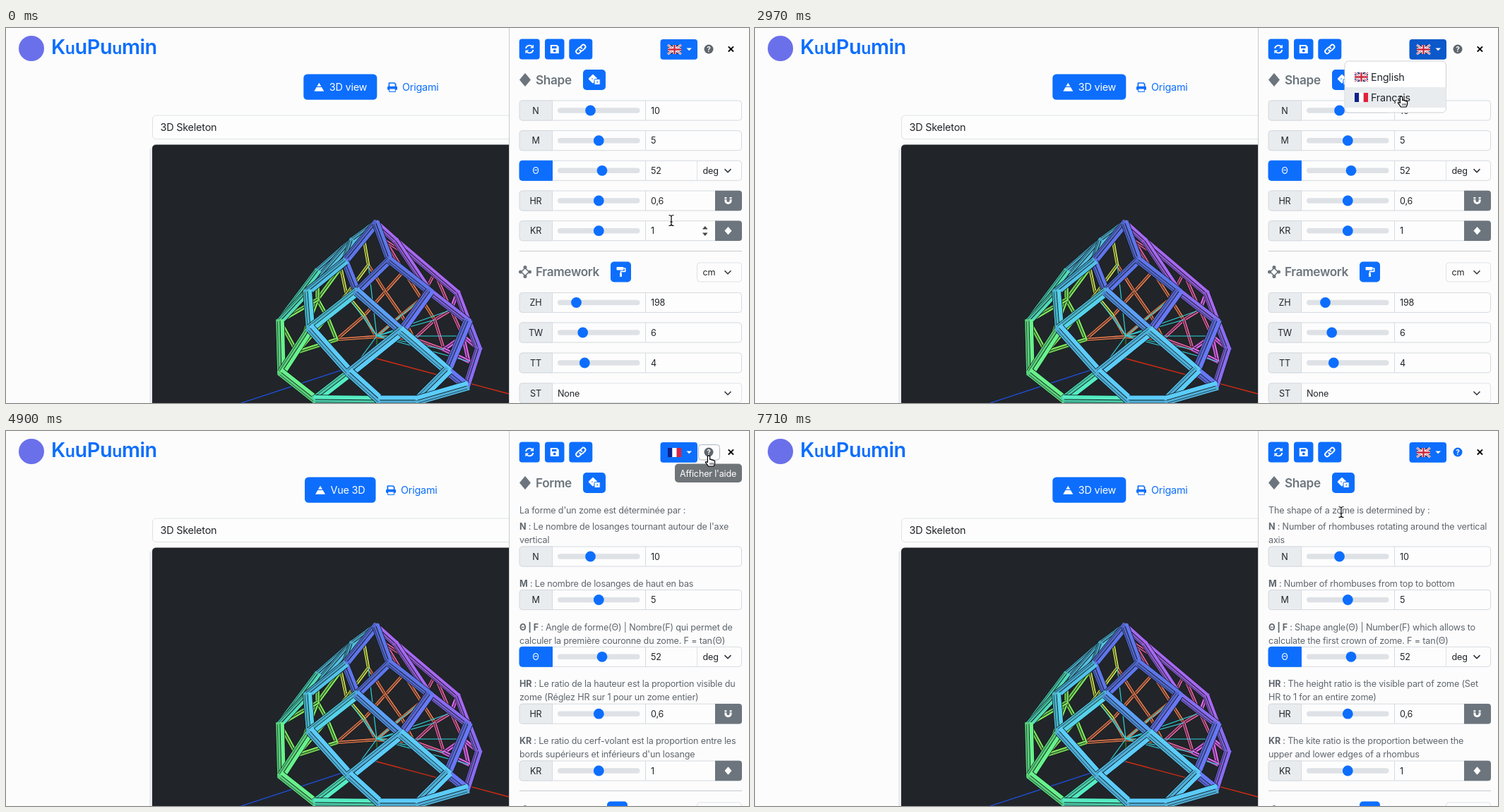
An HTML page for the animation above (8000 ms loop, 1052 px wide and 532 px high).

```html
<!DOCTYPE html>
<html lang="en">
<head>
<meta charset="utf-8">
<title>Zome designer</title>
<style>
  html, body { margin: 0; width: 100%; height: 100%; overflow: hidden; background: #fcfcfc; }
  svg { display: block; width: 1052px; height: 532px; }
  text { font-family: Inter, "Liberation Sans", sans-serif; letter-spacing: -.014em; white-space: pre; }
</style>
</head>
<body>
<svg id="stage" viewBox="0 0 1052 532">
  <g id="page"></g>
  <g id="tabs"></g>
  <g id="panel"></g>
  <g id="cursor"></g>
</svg>
<script>
const BLUE = '#0d6efd', GREY = '#6c757d', INK = '#212529', LINE = '#dee2e6', SOFT = '#e9ecef';
const LOOP = 8000;
const $ = id => document.getElementById(id);

// ---------- drawing helpers ----------
const rect = (x, y, w, h, fill, r = 0, stroke = 'none') =>
  `<rect x="${x}" y="${y}" width="${w}" height="${h}" rx="${r}" fill="${fill}" stroke="${stroke}"/>`;
const path = (d, fill, stroke = 'none', w = 1) =>
  `<path d="${d}" fill="${fill}" stroke="${stroke}" stroke-width="${w}" stroke-linejoin="round"/>`;
const circle = (x, y, r, fill) => `<circle cx="${x}" cy="${y}" r="${r}" fill="${fill}"/>`;
const text = (x, y, s, size = 12.6, fill = INK, attrs = '') =>
  `<text x="${x}" y="${y + size * .36}" font-size="${size}" fill="${fill}" ${attrs}>${s}</text>`;
const at = (x, y, body) => `<g transform="translate(${x} ${y})">${body}</g>`;
const chevron = (x, y) => path(`M${x - 4.5} ${y - 2.2}l4.5 4.5 4.5-4.5`, 'none', '#343a40', 1.6);
const diamond = (w, h, fill) => path(`M0 ${-h}L${w} 0 0 ${h} ${-w} 0Z`, fill, fill, 1);

const ring = d => path(d, 'none', '#fff', 1.9);
const icons = {
  sync: path('M-5.2-1A5.3 5.3 0 0 1 4-3.6M5.2 1A5.3 5.3 0 0 1-4 3.6', 'none', '#fff', 1.8) +
    path('M5.8-6.4V-1.4H.9ZM-5.8 6.4V1.4H-.9Z', '#fff'),
  save: path('M-6-6H3.5L6-3.5V6H-6Z', '#fff') + rect(-3.8, -4.2, 6.6, 3.2, BLUE) + circle(0, 2.4, 1.9, BLUE),
  link: `<g transform="rotate(-45)">` + ring('M-1.5 2.6H-5A2.9 2.9 0 0 1-5-3.2H-1A2.9 2.9 0 0 1 1.6 1') +
    ring('M1.5-2.6H5A2.9 2.9 0 0 1 5 3.2H1A2.9 2.9 0 0 1-1.6-1') + '</g>',
  dice: `<g transform="rotate(45 -2 -1)">${rect(-7, -6, 9.5, 9.5, '#fff', 1.2)}</g>` +
    rect(0, -1, 8.2, 8, '#fff', 1.2, BLUE) + circle(-3, -1.5, .8, BLUE) + circle(4.2, 3, .9, BLUE),
  roller: rect(-6, -7, 10, 4.6, '#fff', 1) + path('M4-5H6.2V-.6H0V2', 'none', '#fff', 1.6) + rect(-1.5, 1.5, 3, 5.5, '#fff', .8),
  magnet: path('M-3.6-5V0A3.6 3.6 0 0 0 3.6 0V-5', 'none', '#fff', 3) + path('M-6-2.3H-1.5M1.5-2.3H6', 'none', GREY, 1),
  kite: diamond(4.5, 5.2, '#fff'),
  frame: path('M0-5.5L5.5 0 0 5.5-5.5 0Z', 'none', GREY, 1.7) +
    [[0, -6.5], [6.5, 0], [0, 6.5], [-6.5, 0]].map(p => circle(p[0], p[1], 2.5, GREY)).join(''),
  view: path('M0-6.2L3-1.2H-3ZM-3.7 0H3.7L7 5.8H-7Z', '#fff'),
  print: path('M-4.6-1V-6H3L4.6-4.4V-1', 'none', BLUE, 1.7) + rect(-7, -1.2, 14, 5.2, BLUE, 1.4) +
    rect(-4.3, 2, 8.6, 4.4, '#fcfcfc', 0, BLUE)
};

const flags = {
  en: rect(0, 0, 19, 13, '#1f3474', 1) + path('M0 0L19 13M19 0L0 13', 'none', '#fff', 2.8) +
    path('M0 0L19 13M19 0L0 13', 'none', '#d0283c', 1) + path('M9.5 0V13M0 6.5H19', 'none', '#fff', 4.4) +
    path('M9.5 0V13M0 6.5H19', 'none', '#d0283c', 2.4),
  fr: rect(0, 0, 6.4, 13, '#10218b') + rect(6.3, 0, 6.4, 13, '#fff') + rect(12.7, 0, 6.3, 13, '#e1203a')
};

const bar = 'M-3.5-7.5Q0-7.5 0-5.5 0-7.5 3.5-7.5M0-6V6M-3.5 7.5Q0 7.5 0 5.5 0 7.5 3.5 7.5M-1.8 2H1.8';
const pointers = {
  ibeam: path(bar, 'none', '#fff', 2.6) + path(bar, 'none', '#000', 1.2),
  arrow: path('M0 0V13.5L3.2 10.6 5.3 15.6 7.7 14.6 5.6 9.7H10Z', '#000', '#fff', 1.1),
  hand: path('M-1.6 1Q0-1.2 1.6 1V5.6Q3.3 4.6 4.2 6.1 5.8 5.4 6.6 6.9 8.6 6.5 8.6 8.4V11Q8.4 13 7 15H-.6Q-2 12.6-4.5 9.6-4.8 7.5-1.6 9.4Z', '#fff', '#000', 1.2) +
    path('M2 10V13M4.2 10V13M6.3 10V13', 'none', '#000', .8)
};

// ---------- wireframe dome ----------
const nodes = {
  A: [524, 277], B: [480, 331], C: [543, 329], M: [490, 302], I: [552, 302], N: [427, 374], D: [497, 374],
  F: [600, 374], J: [639, 376], V: [441, 345], Q: [388, 416], O: [431, 426], G: [560, 430], H: [654, 416],
  K: [669, 455], S: [390, 489], P: [487, 489], L: [625, 486], W: [652, 508], T: [438, 527], X: [530, 528], Y: [583, 528],
  a: [507, 302], b: [537, 302], c: [474, 340], d: [513, 336], e: [563, 345], f: [607, 347], g: [441, 385],
  h: [482, 378], i: [537, 374], j: [588, 384], k: [630, 400], u: [455, 410], v: [507, 408], w: [560, 407],
  x: [607, 414], y: [647, 437], n: [412, 460], o: [468, 442], p: [524, 438], q: [578, 441], r: [620, 456], s: [655, 473]
};
// [width, colour, node pairs], far to near
const farBeams = [
  [5.5, '#e0794f', 'ei id iv iw ej jw jx vo vp wp wq op pq'],
  [5.5, '#e0609c', 'be bf fj fk kx ky xq xr qr'],
  [6.5, '#e066ee', 'Ab If Jk ys yr rs yK Jf kJ kH Hy'],
  [5.5, '#c9dc50', 'Aa ad ac ch dh hu hv'],
  [6.5, '#7fe65c', 'cg gu gn uo un no Vc Vg Qn gQ nS']
];
const nearBeams = [
  [10, '#a768f2', 'AI IJ JH IF'],
  [11, '#8a6cf2', 'FH HK KW'],
  [10, '#55bfe0', 'AM MV MN MB VN'],
  [10.5, '#52dcb8', 'VQ NQ'],
  [12.5, '#68f28c', 'QS OS ST'],
  [11.5, '#5e76ea', 'AB AC BD CD CF'],
  [11.5, '#52c2ea', 'BN'],
  [13, '#6878f6', 'FG HL LW'],
  [13, '#56d2ea', 'NO DO'],
  [13, '#5c9ff6', 'DG'],
  [13, '#56ecc2', 'PT TX'],
  [14, '#5cccfa', 'OP GP GL PX LY XY YW']
];

// Two planks side by side, one in shade.
function beam(a, b, width, colour) {
  const [x1, y1] = nodes[a], [x2, y2] = nodes[b];
  const len = Math.hypot(x2 - x1, y2 - y1), nx = (y1 - y2) / len, ny = (x2 - x1) / len;
  const stroke = (w, c, off, cap = 'butt') =>
    `<path d="M${x1 + nx * off} ${y1 + ny * off}L${x2 + nx * off} ${y2 + ny * off}" stroke="${c}" stroke-width="${w}" stroke-linecap="${cap}"/>`;
  const plank = width / 2 - .9, off = width / 4;
  return stroke(width + .6, '#10161c', 0) + stroke(plank, colour, -off, 'square') + stroke(plank, colour, off, 'square') +
    stroke(plank, '#0002', off, 'square') + (width > 9 ? stroke(.7, '#14202a', off + .6) : '');
}
const drawBeams = groups => groups.map(([width, colour, pairs]) =>
  pairs.split(' ').map(p => beam(p[0], p[1], width, colour)).join('')).join('');

function dome() {
  const axis = (x, y, c) => path(`M525 469L${x} ${y}`, 'none', c, 1.3);
  const spokes = [...'dhvjwxyrsPk'].map(n => `M525 437L${nodes[n]}`).join('');
  return axis(712, 519, '#d62a12') + axis(333, 532, '#1f50e6') + axis(525, 437, '#2c8a24') +
    drawBeams(farBeams) + path(spokes, 'none', '#2fd3dc', 1.2) + drawBeams(nearBeams);
}

// ---------- page ----------
const small = s => `<tspan font-size="23">${s}</tspan>`;
$('page').innerHTML =
  circle(36, 29, 18, '#6a70ea') +
  text(64, 27, `K${small('u')}uPu${small('u')}min`, 28.8, BLUE, 'font-weight="600"') +
  rect(203, 169, 12, 380, SOFT, 6) +
  rect(207.5, 124, 540, 33.5, '#fdfdfd', 5, LINE) + text(218.5, 141, '3D Skeleton', 14.4) +
  path('M207 532V171Q207 165.5 213 165.5H712V532Z', INK) + dome();

const words = {
  en: {
    view: '3D view', shape: 'Shape', frame: 'Framework',
    help: ['The shape of a zome is determined by :',
      'N| : Number of rhombuses rotating around the vertical', 'axis',
      'M| : Number of rhombuses from top to bottom',
      'Θ | F| : Shape angle(Θ) | Number(F) which allows to', 'calculate the first crown of zome. F = tan(Θ)',
      'HR| : The height ratio is the visible part of zome (Set', 'HR to 1 for an entire zome)',
      'KR| : The kite ratio is the proportion between the', 'upper and lower edges of a rhombus']
  },
  fr: {
    view: 'Vue 3D', shape: 'Forme', frame: 'Charpente',
    help: ["La forme d'un zome est déterminée par :",
      "N| : Le nombre de losanges tournant autour de l'axe", 'vertical',
      'M| : Le nombre de losanges de haut en bas',
      'Θ | F| : Angle de forme(Θ) | Nombre(F) qui permet de', 'calculer la première couronne du zome. F = tan(Θ)',
      'HR| : Le ratio de la hauteur est la proportion visible du', 'zome (Réglez HR sur 1 pour un zome entier)',
      'KR| : Le ratio du cerf-volant est la proportion entre les', "bords supérieurs et inférieurs d'un losange"]
  }
};
const helpY = [112.5, 135, 154, 216, 278, 297, 358.5, 377.5, 439.5, 458.5];

function helpLine(line, i) {
  const cut = /^(?:N|M|Θ \| F|HR|KR)(?=\| :)/.exec(line);
  const body = cut ? `<tspan font-weight="700">${cut[0]}</tspan>${line.slice(cut[0].length + 1)}` : line;
  return text(727, helpY[i], body, 12.6, '#5f666d');
}

function tabs(lang) {
  const [x, w, px] = lang === 'en' ? [421.3, 104, 547] : [423, 100.5, 545];
  return rect(x, 65.5, w, 36.3, BLUE, 5.4) + at(x + 22, 84, icons.view) +
    text(x + 36.5, 84, words[lang].view, 14.4, '#fff') +
    at(px, 84, icons.print) + text(px + 14, 84, 'Origami', 14.4, BLUE);
}

function label(name, y, on) {
  return path(`M773.5 ${y - 14}V${y + 14}H731Q727 ${y + 14} 727 ${y + 10}V${y - 10}Q727 ${y - 14} 731 ${y - 14}Z`,
    on ? BLUE : SOFT, on ? BLUE : '#d5dadf') +
    text(750, y, name, 12.6, on ? '#fff' : INK, 'text-anchor="middle"');
}

function row(name, y, value, thumb, end = '') {
  let out = rect(727.5, y - 14, 314, 28, '#fdfdfd', 4, '#d5dadf') + label(name, y, name === 'Θ') +
    path(`M905.5 ${y - 14}V${y + 14}`, 'none', '#d5dadf') +
    rect(781, y - 3.7, 116.5, 7.4, LINE, 3.7) + circle(thumb, y, 7.4, BLUE) + text(913, y, value);
  if (end === 'deg') out += path(`M978.5 ${y - 14}V${y + 14}`, 'none', LINE) + text(986.5, y, 'deg') + chevron(1022, y);
  else if (end) out += path(`M1004 ${y - 14.3}H1038Q1042 ${y - 14.3} 1042 ${y - 10}V${y + 10}Q1042 ${y + 14.3} 1038 ${y + 14.3}H1004Z`, GREY) +
    at(1022.5, y, icons[end]);
  return out;
}

const heading = (y, icon, title, bx, button) => at(735, y, icon) +
  text(750, y, title, 17.2, GREY, 'font-weight="600" style="letter-spacing:-.02em"') +
  rect(bx, y - 14.5, bx < 830 ? 32 : 29, 29, BLUE, 5) + at(bx + (bx < 830 ? 16 : 14.5), y, button);

function menu(hover, active) {
  const item = (key, name, y) => {
    const bg = active === key ? BLUE : hover === key ? SOFT : '';
    return (bg ? rect(835.5, y - 14.5, 143, 29, bg) : '') + at(849, y - 6.5, flags[key]) +
      text(872, y, name, 14.4, active === key ? '#fff' : INK);
  };
  return rect(835, 47, 143.5, 73, '#fff', 5.5, '#cfd1d3') + item('en', 'English', 69.5) + item('fr', 'Français', 98.5);
}

function panel(s) {
  const w = words[s.lang], ys = s.help ? [178, 239.5, 320.3, 401.2, 482] : [117, 159.7, 202.3, 245, 287.7];
  const rule = s.help ? 511 : 317;
  let out = rect(712, 0, 340, 532, '#fcfcfc') + path('M712.5 0V532', 'none', '#c9cbcd') +
    [[726.7, 29, 'sync'], [763, 27.5, 'save'], [797.3, 33, 'link']]
      .map(([x, bw, n]) => rect(x, 15.5, bw, 29, BLUE, 4) + at(x + bw / 2, 30, icons[n])).join('') +
    rect(926.5, 16, 52.5, 28.8, { open: '#0a58ca', hover: '#0b5ed7' }[s.button] || BLUE, 4) +
    at(937, 24, flags[s.lang]) + path('M963.5 28.5H971L967.2 32.3Z', '#fff');
  if (s.helpHover) out += rect(980.5, 19.5, 30, 21.5, '#fdfdfd', 4, '#adb5bd');
  out += circle(995, 30, 6.5, s.helpOn ? BLUE : '#5f666d') +
    text(995, 30, '?', 10, '#fff', 'text-anchor="middle" font-weight="700"') +
    path('M1022.8 26.3L1030 33.5M1030 26.3L1022.8 33.5', 'none', '#000', 1.8) +
    heading(73.5, diamond(7.5, 9, GREY), w.shape, 817, icons.dice) +
    row('N', ys[0], '10', 827.5) + row('M', ys[1], '5', 839.3) + row('Θ', ys[2], '52', 844, 'deg') +
    row('HR', ys[3], '0,6', 839.3, 'magnet') + row('KR', ys[4], '1', 839.3, 'kite');
  if (s.spin) out += path('M986 285.5L989.8 281 993.6 285.5ZM986 290.5L989.8 295 993.6 290.5Z', '#444');
  if (s.help) out += w.help.map(helpLine).join('');
  out += path(`M727 ${rule - .5}H1042`, 'none', '#c8cacc') +
    heading(rule + 29, icons.frame, w.frame, s.lang === 'en' ? 856 : 851, icons.roller) +
    rect(978.5, rule + 16, 63, 27, '#fdfdfd', 4, LINE) + text(986.5, rule + 29.5, 'cm') + chevron(1022, rule + 29.5);
  if (!s.help) out += row('ZH', 389.5, '198', 807.5) + row('TW', 432, '6', 816.7) + row('TT', 475, '4', 819.3) +
    rect(727.5, 504, 314, 27.5, '#fdfdfd', 4, LINE) + label('ST', 518, false) + text(781, 518, 'None') + chevron(1022, 518);
  if (s.menu) out += menu(s.hover, s.active);
  if (s.tip) out += rect(947, 46.5, 95, 26.5, '#6f7479', 5) + text(954, 60, "Afficher l'aide", 12.6, '#fff');
  return out;
}

// ---------- timeline ----------
const moves = [
  [0, 942, 273, 'ibeam'], [140, 943, 262, 'ibeam'], [290, 947, 226, 'ibeam'], [440, 951, 172, 'ibeam'],
  [590, 955, 112, 'ibeam'], [740, 957, 70, 'arrow'], [890, 958, 48, 'arrow'], [1040, 957, 42, 'hand'],
  [1190, 956, 40, 'hand'], [1340, 955, 39, 'hand'], [1940, 929, 77, 'hand'], [2090, 927, 81, 'hand'],
  [2240, 925, 86, 'hand'], [2390, 922, 91, 'hand'], [2540, 919, 94, 'hand'], [2690, 917, 96, 'hand'],
  [2820, 916, 97, 'hand'], [2970, 915, 97, 'hand'], [3570, 915, 95, 'arrow'], [3860, 921, 88, 'arrow'],
  [4010, 943, 68, 'arrow'], [4160, 971, 50, 'arrow'], [4300, 990, 39, 'hand'], [4450, 995, 35, 'hand'],
  [5350, 988, 36, 'hand'], [5500, 966, 36, 'hand'], [5650, 955, 36, 'hand'], [5950, 945, 50, 'hand'],
  [6070, 925, 66, 'hand'], [6220, 915, 71, 'hand'], [6520, 915, 73, 'arrow'], [7110, 908, 77, 'arrow'],
  [7260, 886, 88, 'arrow'], [7410, 858, 102, 'arrow'], [7560, 838, 112, 'ibeam'], [7710, 830, 115, 'ibeam']
];
const states = [
  [0, { lang: 'en', spin: true }], [140, { spin: false }], [1040, { button: 'hover' }],
  [1640, { button: 'open', menu: true }], [1940, { hover: 'en' }], [2240, { hover: 'fr' }], [3270, { active: 'fr' }],
  [3570, { lang: 'fr', menu: false, active: '', hover: '', button: 'hover' }], [3860, { button: '' }],
  [4300, { helpHover: true }], [4450, { tip: true }], [4900, { help: true }], [5050, { helpOn: true }],
  [5350, { tip: false, helpHover: false }], [5500, { button: 'hover' }], [5800, { button: 'open', menu: true }],
  [6070, { hover: 'en' }], [6370, { active: 'en' }],
  [6520, { lang: 'en', menu: false, active: '', hover: '', button: 'hover' }], [6670, { button: '' }]
];

const last = {};
function put(id, key, draw) {
  if (last[id] === key) return;
  last[id] = key;
  $(id).innerHTML = draw();
}

function render(t) {
  const s = Object.assign({}, ...states.filter(e => e[0] <= t).map(e => e[1]));
  const [, x, y, kind] = moves.filter(m => m[0] <= t).pop();
  put('tabs', s.lang, () => tabs(s.lang));
  put('panel', JSON.stringify(s), () => panel(s));
  put('cursor', kind, () => pointers[kind]);
  $('cursor').setAttribute('transform', `translate(${x} ${y})`);
}

const start = performance.now();
function tick() {
  render((performance.now() - start) % LOOP);
  requestAnimationFrame(tick);
}
tick();
</script>
</body>
</html>
```
